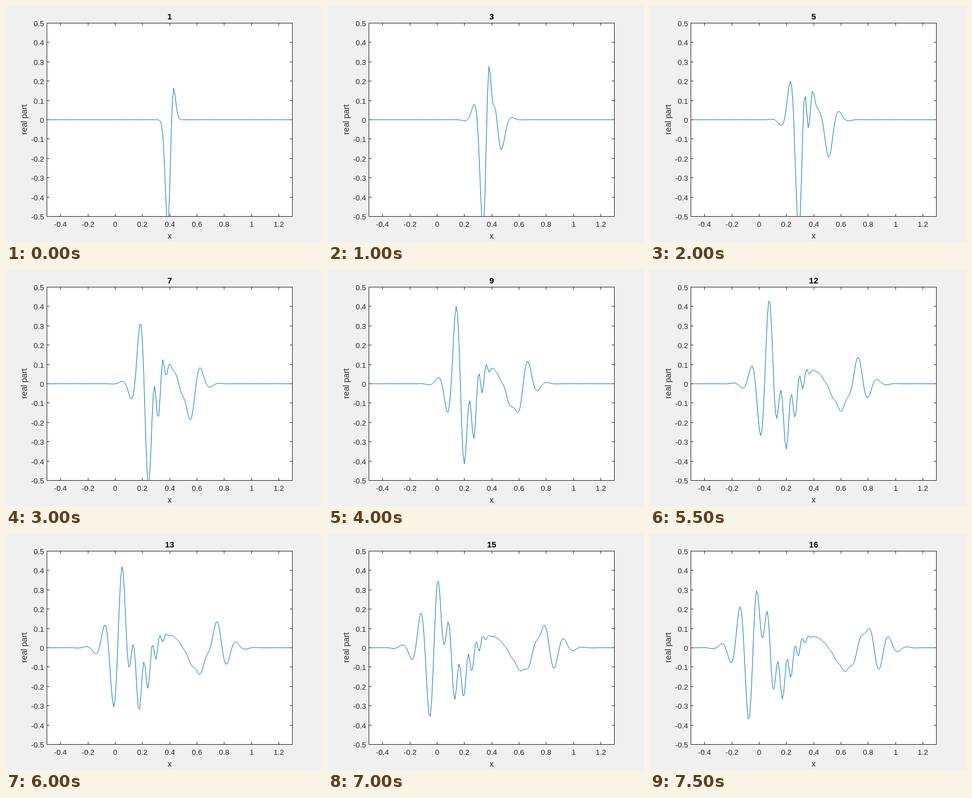
Write an HTML page with a canvas that moves like this. It is 560 px wide and 420 px high and loops after 8 s.

```html
<!DOCTYPE html>
<html lang="en">
<head>
<meta charset="utf-8">
<title>Wave packet</title>
<style>
html, body { margin: 0; width: 100%; height: 100%; overflow: hidden; background: #f0f0f0; }
canvas { display: block; }
</style>
</head>
<body>
<canvas id="stage" width="560" height="420"></canvas>
<script>
const ctx = document.getElementById('stage').getContext('2d');
const LEFT = 72, RIGHT = 507, TOP = 30, BOTTOM = 374;
const FRAMES = 16, STEP_MS = 500;
const INK = '#262626', FONT = '"Liberation Sans", Arial, sans-serif';

// Gaussian packet exp(-(x-X0)^2 / 2 VAR) * exp(i K0 x) on a grid of spacing DX,
// advanced by Crank-Nicolson steps of the free Schrödinger equation.
const X0 = 0.4, K0 = -26.53, VAR = 5e-4, DX = 0.01, ALPHA = 2.5e-4;
const DK = Math.PI / 2;
const modes = [];
for (let k = -280; k <= 230; k += DK) {
  modes.push({
    k,
    amp: DK * Math.sqrt(VAR / (2 * Math.PI)) * Math.exp(-VAR * (k - K0) ** 2 / 2),
    turn: 2 * Math.atan(ALPHA * 2 * (1 - Math.cos(k * DX)) / DX ** 2)
  });
}

const realPart = (x, step) => modes.reduce((sum, m) =>
  sum + m.amp * Math.cos(m.k * (x - X0) + K0 * X0 - m.turn * step), 0);

const px = x => LEFT + 0.5 + (x + 0.5) * (RIGHT - LEFT) / 1.8;
const py = y => TOP + 0.5 + (0.5 - y) * (BOTTOM - TOP);
const snap = v => Math.round(v - 0.5) + 0.5;

function text(str, x, y, align = 'center', font = '13.33px ', color = INK) {
  ctx.font = font + FONT;
  ctx.textAlign = align;
  ctx.fillStyle = color;
  ctx.fillText(str, x, y);
}

function line(x1, y1, x2, y2) {
  ctx.beginPath();
  ctx.moveTo(x1, y1);
  ctx.lineTo(x2, y2);
  ctx.stroke();
}

function drawAxes() {
  ctx.strokeStyle = INK;
  ctx.lineWidth = 1;
  ctx.strokeRect(LEFT + 0.5, TOP + 0.5, RIGHT - LEFT, BOTTOM - TOP);
  for (let i = -2; i <= 6; i++) {
    const x = snap(px(i / 5));
    line(x, TOP, x, TOP + 5);
    line(x, BOTTOM - 4, x, BOTTOM + 1);
    text(String(i / 5), x, 393);
  }
  for (let i = -5; i <= 5; i++) {
    const y = snap(py(i / 10));
    line(LEFT, y, LEFT + 5, y);
    line(RIGHT - 4, y, RIGHT + 1, y);
    text(String(i / 10), 67.5, y + 5.5, 'right');
  }
  text('x', 290, 414, 'center', '14.67px ');
  ctx.save();
  ctx.translate(37, 202);
  ctx.rotate(-Math.PI / 2);
  text('real part', 0, 0, 'center', '14.67px ');
  ctx.restore();
}

function drawCurve(step) {
  ctx.save();
  ctx.beginPath();
  ctx.rect(LEFT, TOP, RIGHT - LEFT + 1, BOTTOM - TOP + 1);
  ctx.clip();
  ctx.beginPath();
  for (let i = -50; i <= 130; i++) {
    const x = i * DX;
    ctx.lineTo(px(x), py(realPart(x, step)));
  }
  ctx.strokeStyle = '#0072bd';
  ctx.lineWidth = 1;
  ctx.lineJoin = 'round';
  ctx.stroke();
  ctx.restore();
}

function draw(step) {
  ctx.fillStyle = '#f0f0f0';
  ctx.fillRect(0, 0, 560, 420);
  ctx.fillStyle = '#fff';
  ctx.fillRect(LEFT, TOP, RIGHT - LEFT + 1, BOTTOM - TOP + 1);
  drawCurve(step);
  drawAxes();
  text(String(step + 1), 290, 24, 'center', 'bold 14.67px ', '#000');
}

let start, shown = -1;
function tick(now) {
  start ??= now;
  const step = Math.floor((now - start) / STEP_MS) % FRAMES;
  if (step !== shown) draw(shown = step);
  requestAnimationFrame(tick);
}
requestAnimationFrame(tick);
</script>
</body>
</html>
```
